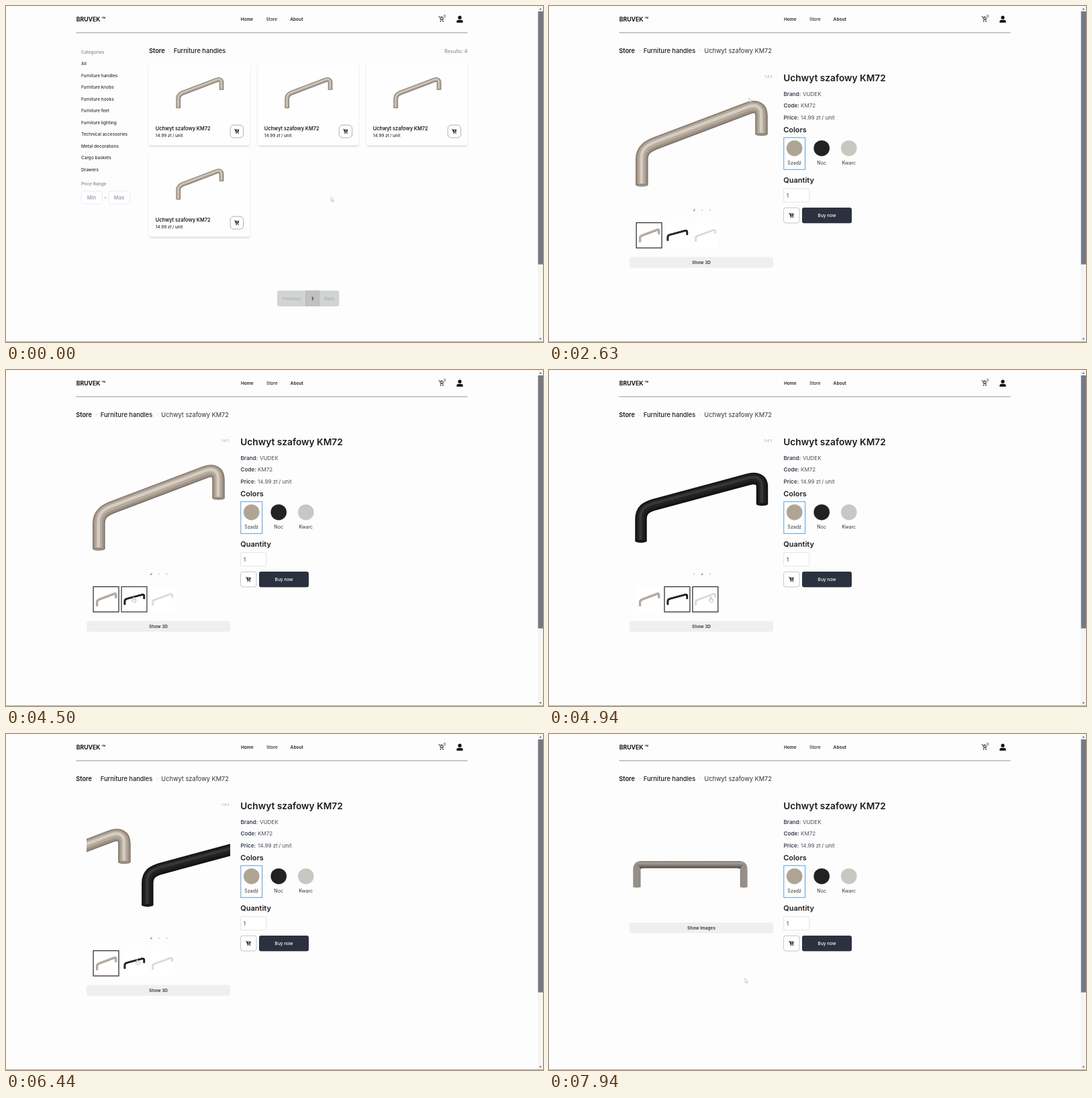
An HTML page that plays this animation: 800x500 px, repeating every 8 s.

```html
<!DOCTYPE html>
<html lang="en">
<head>
<meta charset="utf-8">
<title>Furniture store</title>
<style>
html, body { margin: 0; width: 100%; height: 100%; overflow: hidden; background: #fdfdfd; }
svg { display: block; width: 100vw; height: 100vh; }
text { font-family: Inter, "Open Sans", sans-serif; white-space: pre; }
</style>
</head>
<body>
<svg id="stage" viewBox="0 0 800 500"></svg>
<script>
const LOOP = 8000;
const BRAND = "BRUVEK ™", MAKER = "VUDEK", CODE = "KM72";
const ITEM = "Uchwyt szafowy " + CODE, PRICE = "14.99 zł / unit";

// --- markup helpers ---
const text = (x, y, size, str, weight = 500, fill = "#222", anchor = "start") =>
  `<text x="${x}" y="${y}" font-size="${size}" font-weight="${weight}" fill="${fill}" text-anchor="${anchor}">${str}</text>`;
const rect = (x, y, w, h, r, fill, stroke = "none", sw = 0.7) =>
  `<rect x="${x}" y="${y}" width="${w}" height="${h}" rx="${r}" fill="${fill}" stroke="${stroke}" stroke-width="${sw}"/>`;
const circle = (x, y, r, fill) => `<circle cx="${x}" cy="${y}" r="${r}" fill="${fill}"/>`;
const group = (id, body, attrs = "") => `<g id="${id}" ${attrs}>${body}</g>`;
const use = (id, x, y, s = 1) => `<use href="#${id}" transform="translate(${x} ${y}) scale(${s})"/>`;
const chevron = x =>
  `<path d="M${x - 1} 64.5l2 2-2 2" fill="none" stroke="#d2d2d2" stroke-width=".7"/>`;

// A bent tube: layered strokes from the dark rim to the highlight
function tube(id, d, w, ends, tones) {
  const layers = [[1, 0, 0], [0.84, -0.2, -0.4], [0.58, -0.4, -1.2], [0.24, -0.6, -2]];
  const caps = ends.map(([x, y]) =>
    `<ellipse cx="${x}" cy="${y}" rx="${w / 2}" ry="${w * 0.15}" fill="${tones[0]}"/>` +
    `<ellipse cx="${x}" cy="${y}" rx="${w * 0.42}" ry="${w * 0.11}" fill="${tones[1]}"/>`).join("");
  const strokes = layers.map(([k, dx, dy], i) =>
    `<path d="${d}" transform="translate(${dx} ${dy})" fill="none" stroke="${tones[i]}" stroke-width="${w * k}"/>`).join("");
  return group(id, caps + strokes);
}

const defs = `<defs>
  <filter id="soft" x="-10%" y="-10%" width="120%" height="130%"><feGaussianBlur stdDeviation="1.5"/></filter>
  <filter id="wide" x="-10%" y="-10%" width="120%" height="130%"><feGaussianBlur stdDeviation="3"/></filter>
  <filter id="tiny" x="-50%" y="-50%" width="200%" height="200%"><feGaussianBlur stdDeviation=".35"/></filter>
  <clipPath id="view"><rect x="120" y="98" width="214" height="214"/></clipPath>
  <linearGradient id="bar" x1="0" y1="189" x2="0" y2="200" gradientUnits="userSpaceOnUse">
    <stop offset="0" stop-color="#857e79"/><stop offset=".3" stop-color="#a49d96"/>
    <stop offset=".65" stop-color="#7d7570"/><stop offset="1" stop-color="#483d3f"/>
  </linearGradient>` +
  tube("steel", "M138.3 266V228C138.3 214 148 208.5 158 204.5L297 152C308 148 316.5 151 316.5 163V190.5",
    18.6, [[138.3, 266], [316.5, 190.5]], ["#81766b", "#9e9285", "#b5aa9d", "#d5cdc3"]) +
  tube("black", "M137 254.5V222C137 208 145 204 156 200.5L296 163C308 159.5 317.5 162 317.5 174V199.5",
    17.4, [[137, 254.5], [317.5, 199.5]], ["#0e0e0f", "#19191a", "#222223", "#37373a"]) +
  tube("quartz", "M135.6 260V230C135.6 218 143 213 154 209L298 157.5C309 153.8 318.6 156 318.6 168V187",
    14.8, [[135.6, 260], [318.6, 187]], ["#c9c4bd", "#d6d2cb", "#dfdbd5", "#ece9e5"]) +
  group("cart",
    `<path d="M-4.2-3.6h1.5l1.5 5.4h4.6" fill="none" stroke="#20242c" stroke-width=".8"/>
     <path d="M-2.6-3.1H4.2L3.3.9H-1.5z" fill="#20242c"/>
     <path d="M.9-2.7V.3M-.6-1.2H2.4" stroke="#fff" stroke-width=".65"/>` +
    circle(-0.7, 3.2, 0.85, "#20242c") + circle(2.9, 3.2, 0.85, "#20242c")) +
  group("arrow", `<path d="M0 0V6.3L1.5 5 2.5 7.3 3.5 6.9 2.5 4.7H4.5Z" fill="#fff" stroke="#999" stroke-width=".5"/>`) +
  group("hand", `<path d="M-.7.6Q0-.4.7.6V3L3 3.5Q4 3.8 3.8 4.8L3.2 7.8H-.5L-2.6 5Q-2.6 3.9-1.6 4.3L-.7 5Z"
     fill="#fff" stroke="#8c8c8c" stroke-width=".55"/><path d="M1.5 3.4V5M2.6 3.7V5" stroke="#aaa" stroke-width=".35"/>`) +
  `</defs>`;

const header =
  text(104.7, 23, 8.7, BRAND, 700, "#181818") +
  group("nav", text(349.5, 22.2, 6.6, "Home", 600) + text(387.6, 22.2, 6.5, "Store", 500) + text(423.2, 22.2, 6.6, "About", 600)) +
  `<path d="M644.4 15.6h1.6l1.4 5h4.3M646.3 17h1.8M650.5 17.7l1.5.2-.6 1.4h-4.2M649.2 15v3M647.8 16.6h2.8"
    fill="none" stroke="#222" stroke-width=".8"/>` +
  circle(647.5, 22.7, 0.9, "#222") + circle(651, 22.7, 0.9, "#222") +
  text(652, 17, 5, "0", 500) +
  circle(676, 17.2, 2.6, "#111") +
  `<path d="M671.3 24.8V23.5Q671.3 20.8 674 20.8H678Q680.7 20.8 680.7 23.5V24.8Z" fill="#111"/>` +
  `<path d="M104.5 39.8H687.5" stroke="#8b8b8b" stroke-width=".9"/>`;

const scrollbar =
  rect(792, 0, 8, 500, 0, "#f5f5f6") + rect(792.6, 8, 7.4, 376.5, 0, "#737a86") +
  `<path d="M794.4 5.4l1.8-2.2 1.8 2.2zM794.4 494.6l1.8 2.2 1.8-2.2z" fill="#555"/>
   <path d="M0 499.6H800" stroke="#8f8f8f" stroke-width=".8"/>`;

// --- list page ---
const kinds = ["All", "Furniture handles", "Furniture knobs", "Furniture hooks", "Furniture feet",
  "Furniture lighting", "Technical accessories", "Metal decorations", "Cargo baskets", "Drawers"];

function card(col, row) {
  const dx = col * 162, dy = row * 136;
  const first = col + row === 0;
  return `<g transform="translate(${dx} ${dy})">` +
    (first ? `<rect id="glow" x="216" y="92" width="144" height="119" rx="4" fill="#000" fill-opacity=".17" filter="url(#wide)"/>` : "") +
    `<rect x="213.5" y="88" width="149.5" height="121" rx="3" fill="#000" fill-opacity=".15" filter="url(#soft)"/>` +
    rect(213, 83, 150.4, 124.3, 2.5, "#fefefe") +
    use("steel", 206.8, 55.3, 0.361) +
    text(222.8, 184.6, 7.35, ITEM, 600, "#1d1d1d") +
    text(222.8, 195.2, 6.4, PRICE, 450, "#333") +
    rect(334.2, 177.2, 19.4, 18.8, 5, "#fff", "#8f8f94", 0.7) +
    use("cart", 343.6, 186.6, 0.88) + "</g>";
}

const listPage =
  text(112, 70.9, 6.5, "Categories", 600, "#949494") +
  kinds.map((k, i) => text(112, 88.3 + i * 17.5, 6.5, k, 500, "#303030")).join("") +
  text(112, 267.3, 6.5, "Price Range", 600, "#949494") +
  [["Min", 112], ["Max", 153]].map(([s, x]) =>
    rect(x + 0.3, 275.4, 31, 18.8, 3, "#fff", "#e0e2e8") + text(x + 15.6, 288, 7.5, s, 600, "#9ea1b8", "middle")).join("") +
  text(148, 287.6, 7, "-", 500, "#555", "middle") +
  text(213, 69.8, 9.2, "Store", 600, "#151515") + chevron(243.2) +
  text(249.8, 69.8, 9.3, "Furniture handles", 500, "#1d1d1d") +
  text(687.5, 70, 7.25, "Results: 4", 500, "#8e8e8e", "end") +
  card(0, 0) + card(1, 0) + card(2, 0) + card(0, 1) +
  rect(404, 423.4, 92.4, 23.6, 3, "#d2d4d4") + rect(446.5, 423.4, 20, 23.6, 0, "#c1c2c0") +
  `<path d="M446.6 423.4v23.6M466.5 423.4v23.6" stroke="#b0b2b2" stroke-width=".7"/>` +
  text(425.5, 437.5, 6.5, "Previous", 500, "#a7abb0", "middle") +
  text(456.5, 437.5, 6.8, "1", 700, "#222", "middle") +
  text(481.3, 437.5, 6.5, "Next", 500, "#a7abb0", "middle");

// --- product page ---
const fact = (y, label, x, value) =>
  text(349.5, y, 8.1, label, 600, "#3a414e") + text(x, y, 8.05, value, 400, "#4a5160");
const swatch = (x, fill, name) =>
  circle(x, 211.7, 11.8, fill) + text(x, 235.8, 7.1, name, 400, "#333", "middle");
const dot = (x, i) =>
  `<g id="dot${i}"><circle cx="${x + 0.45}" cy="303.1" r="1.7" fill="#000" filter="url(#tiny)"/>${circle(x, 302.6, 1.7, "#fff")}</g>`;

const thumbs = [["steel", 113.8, 309, 0.158], ["black", 155, 308.4, 0.16], ["quartz", 196.8, 308.4, 0.16]];

const gallery =
  `<g clip-path="url(#view)">` +
  group("strip", ["steel", "black", "quartz"].map((id, i) => use(id, i * 214, 0)).join("")) + "</g>" +
  `<text id="count" x="332" y="107" font-size="4.2" fill="#8d8d8d" text-anchor="end"></text>` +
  [215.2, 227.1, 239].map(dot).join("") +
  thumbs.map((a, i) => rect(130.1 + i * 41.9, 322.5, 37.9, 37.5, 0, "#fff") + use(...a) +
    `<rect id="edge${i}" x="${130.1 + i * 41.9}" y="322.5" width="37.9" height="37.5" fill="none" stroke="#333" stroke-width="1.3"/>`).join("");

const model =
  `<path d="M125.3 228V202Q125.3 189 138.5 189H282.5Q295.6 189 295.6 202V228L290 228.8 285 228V203.5Q285 199.4 281 199.4H140Q136.2 199.4 136.2 203.5V228L131 228.8Z" fill="#958e89"/>
   <path d="M130 193.2Q133.5 189 138.5 189H282.5Q287.5 189 291 193.2L284 200.6Q283 199.4 281 199.4H140Q138 199.4 137 200.6Z" fill="url(#bar)"/>
   <path d="M136 228V203.5M285.2 228V203.5" stroke="#716a67" stroke-width=".6"/>`;

const productPage =
  text(104.3, 69.8, 9.2, "Store", 600, "#151515") + chevron(134.6) +
  text(140.8, 69.8, 9.3, "Furniture handles", 500, "#1d1d1d") + chevron(225.2) +
  text(231.3, 69.8, 9.25, ITEM, 400, "#333") +
  text(349.3, 112.2, 13.7, ITEM, 600, "#1b1b1d") +
  fact(133.5, "Brand:", 378, MAKER) + fact(151, "Code:", 375, CODE) + fact(168.5, "Price:", 375, PRICE) +
  text(349.3, 188, 10.9, "Colors", 600, "#1d1d1f") +
  rect(349.8, 195.9, 31.8, 47.4, 0, "#fff", "#5b9bd3", 1) +
  swatch(365.7, "#b0a595", "Szadź") + swatch(406.2, "#222124", "Noc") + swatch(446.8, "#c8c8c2", "Kwarc") +
  text(349.3, 263.4, 11, "Quantity", 600, "#1d1d1f") +
  rect(349.7, 271.7, 38, 20.2, 1, "#fff", "#d8d8d8") + text(354, 284.5, 7.3, "1", 400, "#222") +
  rect(349.6, 300.3, 23.4, 22.6, 3, "#fff", "#b4b6ba", 0.8) + use("cart", 360.9, 311.6, 0.92) +
  rect(377, 300, 74, 23.2, 3, "#2b313f") + text(414, 314, 6.5, "Buy now", 500, "#fff", "middle") +
  group("gallery", gallery) + group("model", model) +
  group("toggle", rect(120, 373.6, 214, 15.8, 3.5, "#efefef") +
    `<text id="label" x="227" y="383.8" font-size="6.5" font-weight="600" fill="#333" text-anchor="middle"></text>`);

document.getElementById("stage").innerHTML = defs + rect(0, 0, 800, 500, 0, "#fdfdfd") + header +
  group("list", listPage) + group("product", productPage) + scrollbar +
  group("pointer", `<use id="shape"/>`);

// --- motion ---
const OPEN = 2310, PICK = [4515, 5130, 6225], SPIN = 7690, MODEL_IN = 7750;
const path = [
  [560, 484.5, 284.5], [1310, 348, 187], [1810, 287.5, 137.5], [2450, 287.5, 137.5], [3000, 330, 134],
  [3250, 330, 134], [3310, 345, 179.5], [3560, 314, 289], [3810, 314, 289], [4440, 190, 337.5],
  [4600, 190, 337.5], [4940, 241, 337.5], [5250, 241, 337.5], [5810, 137.5, 334], [6210, 137.5, 334],
  [6440, 195.5, 335.5], [6940, 344, 350], [7560, 227, 379], [7750, 227, 379], [7940, 292, 363.5]
];
// [on, off] times of the dark border of each thumbnail
const edges = [[[0, PICK[0]], [5630, 9000]], [[4360, PICK[1]]], [[4770, PICK[2]]]];

const el = id => document.getElementById(id);
const clamp = v => Math.min(1, Math.max(0, v));
const ease = v => { v = clamp(v); return v * v * (3 - 2 * v); };
const show = (id, on) => el(id).setAttribute("display", on ? "inline" : "none");
const inside = (x, y, l, t, r, b) => x >= l && x <= r && y >= t && y <= b;

function pointerAt(t) {
  const i = path.findIndex(k => k[0] > t);
  if (i === 0) return path[0].slice(1);
  if (i < 0) return path[path.length - 1].slice(1);
  const a = path[i - 1], b = path[i], p = ease((t - a[0]) / (b[0] - a[0]));
  return [a[1] + (b[1] - a[1]) * p, a[2] + (b[2] - a[2]) * p];
}

function draw(t) {
  const product = t >= OPEN, spin = t >= SPIN;
  const [x, y] = pointerAt(t);
  show("list", !product);
  show("product", product);
  el("nav").setAttribute("transform", `translate(${product ? 0.4 : 0} 0)`);

  const onCard = inside(x, y, 213, 83, 363, 207);
  el("glow").setAttribute("opacity", onCard ? ease((t - 1180) / 150) : 0);

  const slide = PICK.map(p => ease((t - p) / 350));
  const pos = slide[0] + slide[1] - 2 * slide[2];
  const current = t < PICK[0] ? 0 : t < PICK[1] ? 1 : t < PICK[2] ? 2 : 0;
  el("strip").setAttribute("transform", `translate(${-214 * pos} 0)`);
  el("count").textContent = `${current + 1} of 3`;
  edges.forEach((spans, i) => {
    const dark = spans.reduce((m, [on, off]) =>
      Math.max(m, Math.min(clamp((t - on) / 150), 1 - clamp((t - off) / 150))), 0);
    el("edge" + i).setAttribute("opacity", dark);
    el("dot" + i).setAttribute("opacity", i === current ? 1 : 0.3);
  });

  show("gallery", !spin);
  show("model", t >= MODEL_IN);
  el("toggle").setAttribute("transform", `translate(0 ${spin ? -93 : 0})`);
  el("label").textContent = spin ? "Show Images" : "Show 3D";

  const hand = product
    ? !spin && (inside(x, y, 130, 322, 252, 360) || inside(x, y, 120, 373, 334, 389))
    : onCard;
  el("shape").setAttribute("href", hand ? "#hand" : "#arrow");
  el("pointer").setAttribute("transform", `translate(${x} ${y})`);
}

const start = performance.now();
function tick() {
  draw((performance.now() - start) % LOOP);
  requestAnimationFrame(tick);
}
tick();
</script>
</body>
</html>
```
